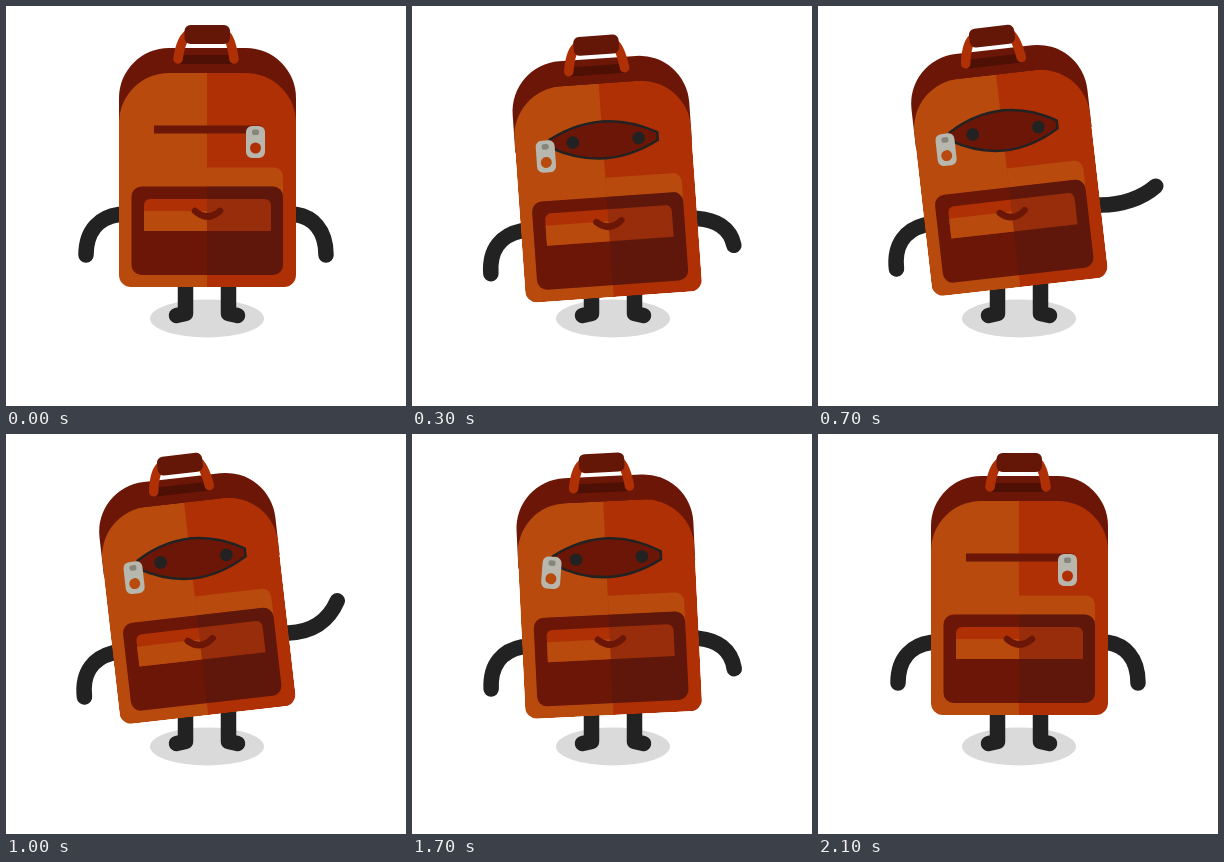
Animation of 400x400 px, one loop 2.2 s. Source, as an HTML page:

```html
<!DOCTYPE html>
<html lang="en">
<head>
<meta charset="utf-8">
<title>Waving backpack</title>
<style>
  html, body { margin: 0; width: 100%; height: 100%; overflow: hidden; background: #fff; }
  svg { display: block; width: 100%; height: 100%; }
  .limb { fill: none; stroke: #222; stroke-width: 15.5; stroke-linecap: round; stroke-linejoin: round; }
  .strap { fill: none; stroke: #b03006; stroke-width: 9.5; stroke-linecap: round; }
  .orange { fill: #b84a0e; }
  .red { fill: #b03006; }
  .dark { fill: #6b1606; }
</style>
</head>
<body>
<svg viewBox="0 0 400 400">
  <defs>
    <clipPath id="front">
      <path d="M113 117A50 50 0 0 1 163 67H240A50 50 0 0 1 290 117V269A12 12 0 0 1 278 281H125A12 12 0 0 1 113 269Z"/>
    </clipPath>
    <clipPath id="pocket"><rect x="125.5" y="180.5" width="151.5" height="88.5" rx="10"/></clipPath>
  </defs>

  <ellipse cx="201" cy="312.5" rx="57" ry="19" fill="#dadada"/>
  <path class="limb" d="M179.5 272V307.5L170.5 309.5M222.5 272V307.5L231.5 309.5"/>

  <g id="bag">
    <path class="limb" d="M118 208.5H113C95 211 80 223 80 249"/>
    <path class="limb" id="arm"/>

    <path class="dark" d="M113 130V92A50 50 0 0 1 163 42H240A50 50 0 0 1 290 92V130Z"/>
    <rect x="174" y="49" width="53" height="9" fill="#4e0f04"/>
    <path class="strap" d="M183 28Q175 32 172 53M219 28Q225 32 228 53"/>
    <rect x="178.5" y="19" width="45.5" height="19" rx="6" fill="#641607"/>

    <g clip-path="url(#front)">
      <rect class="orange" x="113" y="67" width="89" height="214"/>
      <rect class="red" x="201" y="67" width="89" height="214"/>
      <path class="orange" d="M201 161.5H268A9 9 0 0 1 277 170.5V200H201Z"/>
    </g>

    <g clip-path="url(#pocket)">
      <rect class="dark" x="125" y="180" width="153" height="90"/>
      <path class="red" d="M138 225V199A6 6 0 0 1 144 193H259A6 6 0 0 1 265 199V225Z"/>
      <rect class="orange" x="138" y="205" width="63" height="20"/>
      <rect x="201" y="180" width="77" height="90" fill="#222" opacity=".17"/>
    </g>
    <path d="M189 205Q201.5 216 214 205" fill="none" stroke="#6b1606" stroke-width="6.5" stroke-linecap="round"/>

    <path class="dark" id="slit" stroke="#222" stroke-linejoin="round"/>
    <g id="eyes" fill="#222">
      <circle cx="171" cy="124" r="6.3"/>
      <circle cx="237" cy="124" r="6.3"/>
    </g>
    <g id="pull">
      <path fill="#b7b7ad" fill-rule="evenodd" d="M-3.5 -4H3.5A6 6 0 0 1 9.5 2V22A6 6 0 0 1 3.5 28H-3.5A6 6 0 0 1 -9.5 22V2A6 6 0 0 1 -3.5 -4ZM-5.5 18A5.5 5.5 0 1 0 5.5 18A5.5 5.5 0 1 0 -5.5 18Z"/>
      <rect x="-3.5" y="-.5" width="7" height="5.5" rx="2" fill="#85857c"/>
    </g>
  </g>
</svg>
<script>
const LOOP = 2200, STEP = 100;
const { PI, sin, cos, exp, min } = Math;
const el = id => document.getElementById(id);
const mix = (a, b, k) => a + (b - a) * k;
const mixAll = (a, b, k) => a.map((v, i) => mix(v, b[i], k));
const clamp = v => Math.max(0, min(1, v));

// Cubic ease from 0 to 1 between two steps.
function ramp(s, from, to) {
  const p = clamp((s - from) / (to - from));
  return p < .5 ? 4 * p ** 3 : 1 - 4 * (1 - p) ** 3;
}

// Two control points and the hand, relative to the upright bag.
const armRest = [306, 211, 320, 223, 320, 249];
const armLow = [311, 211, 332, 206.5, 347, 196];
const armHigh = [312, 210, 330, 203, 342, 181.7];

function draw(s) {
  const closing = ramp(s, 16, 20.6);

  const angle = 6.5 * (ramp(s, .6, 5) - ramp(s, 13, 20.6));
  const squat = 10 * (s / 3) ** 2.6 * clamp(4 - s);
  el('bag').setAttribute('transform',
    `translate(${angle * .2} ${squat}) rotate(${-angle} 202 281)`);

  const raise = ramp(s, 2, 4.8) - ramp(s, 15, 18);
  const wave = .5 - .5 * cos(2 * PI * (s - 7) / 5.5);
  const arm = mixAll(armRest, mixAll(armLow, armHigh, wave), raise);
  el('arm').setAttribute('d', `M284 208.5H290C${arm.join(' ')}`);

  const gap = 16 * (ramp(s, 1, 3.8) - closing), bend = gap * 2;
  el('slit').setAttribute('d',
    `M148 119.5Q202 ${119.5 - bend} 256 119.5V127.5Q202 ${127.5 + bend} 148 127.5Z`);
  el('slit').setAttribute('stroke-width', 2.5 * clamp((gap - 1) / 9));
  el('eyes').setAttribute('opacity', clamp((gap - 4) / 5));

  // The pull dangles after the opening stroke, then trails on the way back.
  const pullX = mix(249.5, 142.8, ramp(s, .2, 3.3) - closing);
  const dangle = min(s, 6);
  const turn = 8 * sin(PI * clamp((s - 15) / 6)) - 37 * exp(-.42 * dangle) * sin(PI * dangle / 3);
  el('pull').setAttribute('transform', `translate(${pullX} 124) rotate(${turn})`);
}

const start = performance.now();
function tick() {
  draw(Math.floor((performance.now() - start) % LOOP / STEP));
  requestAnimationFrame(tick);
}
tick();
</script>
</body>
</html>
```
